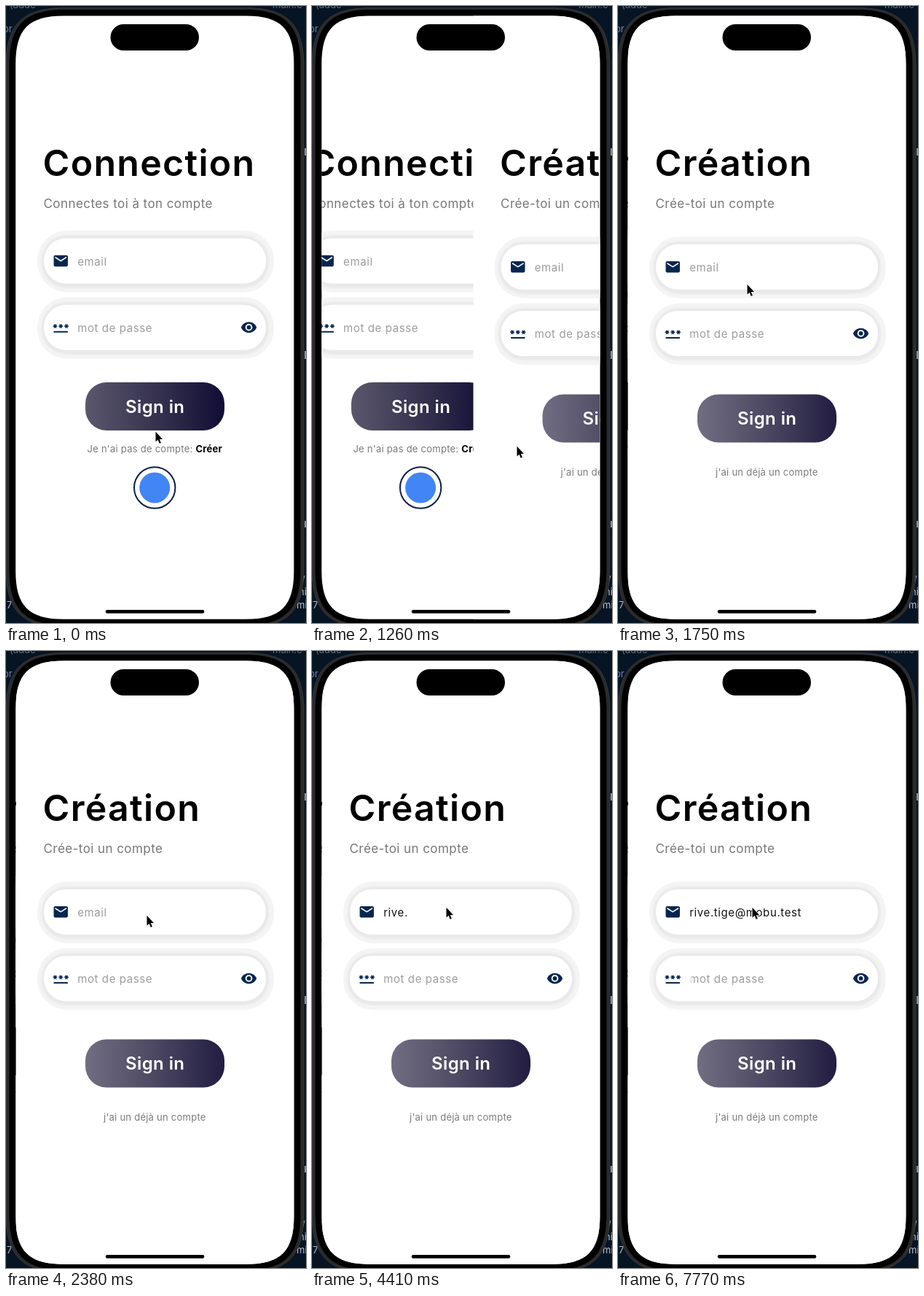
An HTML page that plays this animation: 412 by 846 pixels, repeating every 8000 ms.

```html
<!DOCTYPE html>
<html lang="fr">
<head>
<meta charset="utf-8">
<title>Connection</title>
<style>
  html, body { margin: 0; width: 100%; height: 100%; overflow: hidden; background: #061423; }
  svg { display: block; width: 412px; height: 846px; }
  text { font-family: Inter, "Open Sans", sans-serif; white-space: pre; }
  .code { font: 13px "Noto Sans Mono", "DejaVu Sans Mono", monospace; fill: #5d7087; }
  .title { font-size: 50px; font-weight: 600; letter-spacing: 1.3px; }
  .sub { font-size: 17px; letter-spacing: .43px; fill: #777; }
  .input { font-size: 15px; letter-spacing: .6px; fill: #111; }
  .hint { fill: #9c9c9c; }
  .note { font-size: 13px; letter-spacing: .25px; fill: #7a7a7a; }
  .note tspan { font-weight: 700; fill: #000; }
  .sign { font-size: 24px; font-weight: 600; letter-spacing: .4px; fill: #fff; }
  .icon { fill: #05264f; }
</style>
</head>
<body>
<svg viewBox="0 0 412 846">
  <defs>
    <clipPath id="screen"><path data-box="13.2 13.5 382.2 827.2 66 18"/></clipPath>
    <filter id="soft" x="-10%" y="-30%" width="120%" height="160%"><feGaussianBlur stdDeviation="1"/></filter>
    <linearGradient id="dark">
      <stop stop-color="#5a576d"/><stop offset=".5" stop-color="#37334f"/><stop offset="1" stop-color="#100d35"/>
    </linearGradient>
    <linearGradient id="pale">
      <stop stop-color="#716e82"/><stop offset=".5" stop-color="#4c4862"/><stop offset="1" stop-color="#221d41"/>
    </linearGradient>
    <g id="field">
      <rect x="43" y="-41.5" width="325" height="84.5" rx="41" fill="#f4f4f4"/>
      <rect x="48.5" y="-35" width="312.5" height="72" rx="35" fill="#e9e9e9" filter="url(#soft)"/>
      <rect x="52" y="-31" width="305" height="62" rx="30.5" fill="#fff"/>
    </g>
    <path id="star" d="M3.15 12.95 4 11.47l.85 1.48 1.3-.75-.85-1.48H7v-1.5H5.3l.85-1.47L4.85 7 4 8.47 3.15 7l-1.3.75.85 1.47H1v1.5h1.7l-.85 1.48z"/>
    <g id="mail" class="icon" transform="translate(63.6 -11.7) scale(.97)">
      <path d="M20 4H4c-1.1 0-2 .9-2 2v12c0 1.1.9 2 2 2h16c1.1 0 2-.9 2-2V6c0-1.1-.9-2-2-2zm0 4-8 5-8-5V6l8 5 8-5z"/>
    </g>
    <g id="lock" class="icon">
      <g transform="translate(63.6 -11.4) scale(.97)">
        <path d="M2 17h20v2H2z"/>
        <use href="#star"/><use href="#star" x="8"/><use href="#star" x="16"/>
      </g>
      <path transform="translate(321.9 -11.7) scale(.97)" fill-rule="evenodd" d="M12 4.5C7 4.5 2.73 7.61 1 12c1.73 4.39 6 7.5 11 7.5s9.27-3.11 11-7.5c-1.73-4.39-6-7.5-11-7.5zM12 17a5 5 0 0 1 0-10 5 5 0 0 1 0 10zm0-8a3 3 0 0 0 0 6 3 3 0 0 0 0-6z"/>
    </g>
    <g id="mailField"><use href="#field"/><use href="#mail"/></g>
    <g id="lockField">
      <use href="#field"/><use href="#lock"/>
      <text class="input hint" x="98.2" y="6.3">mot de passe</text>
    </g>
  </defs>

  <!-- editor behind the phone -->
  <rect width="412" height="846" fill="#061423"/>
  <g class="code">
    <text x="5" y="3">(adde</text>
    <text x="366" y="3">main.c</text>
    <text x="-4" y="36" fill="#6f88b0">or</text>
    <text x="1" y="826" fill="#b5c2cf">7</text>
    <text x="406" y="791" fill="#b5c2cf">/</text>
    <text x="402" y="808" fill="#b5c2cf">ni</text>
    <text x="399" y="826" fill="#b5c2cf">mi</text>
    <path d="M410 195h2v10h-2zM410 473h2v11h-2zM410 706h2v9h-2z" fill="#8492a3"/>
  </g>

  <!-- phone -->
  <path data-box="0 2.5 409 849.5 82 22" fill="#2a2a2b" stroke="#3e3e40" stroke-width=".8"/>
  <path data-box="4.5 5 400 844 77 21"/>

  <g clip-path="url(#screen)">
    <rect width="412" height="846" fill="#fff"/>
    <g id="login">
      <text class="title" x="50.5" y="233.3">Connection</text>
      <text class="sub" x="51.5" y="277">Connectes toi à ton compte</text>
      <use href="#mailField" y="349.5"/>
      <text class="input hint" x="98.2" y="355.8">email</text>
      <use href="#lockField" y="440.7"/>
      <rect x="109" y="516" width="191" height="66" rx="29" fill="url(#dark)"/>
      <text class="sign" x="164" y="557.7">Sign in</text>
      <text class="note" x="111.500" y="611.5">Je n'ai pas de compte: <tspan>Créer</tspan></text>
      <circle cx="204.2" cy="660.5" r="28.2" fill="#fff" stroke="#0d1f45" stroke-width="2"/>
      <circle cx="204.2" cy="660.5" r="21" fill="#4285f4"/>
    </g>
    <g id="signup">
      <rect x="14" width="382" height="846" fill="#fff"/>
      <text class="title" x="50.5" y="233.3">Création</text>
      <text class="sub" x="51.5" y="277">Crée-toi un compte</text>
      <use href="#mailField" y="357.7"/>
      <text class="input" id="email" x="98.2" y="364"></text>
      <use href="#lockField" y="449"/>
      <rect id="caret" x="98.5" y="441" width="2.2" height="17" fill="#fff" opacity=".75"/>
      <rect x="109" y="532.5" width="191" height="66" rx="29" fill="url(#pale)"/>
      <text class="sign" x="164" y="574.2">Sign in</text>
      <text class="note" x="134" y="644">j'ai un déjà un compte</text>
    </g>
    <g id="menu">
      <path d="M58 291.7h96q8 0 8 8v22.6q0 8-8 8h-48.5l-7.2 7-7.2-7H58q-8 0-8-8v-22.6q0-8 8-8z" fill="#212121"/>
      <path d="M118.5 292v38" stroke="#323232"/>
      <text x="65" y="316" font-size="14" fill="#fff">Paste</text>
      <path d="M134 308v-3.5h3.5M143.5 304.5h3.5v3.5M147 314.5v3.5h-3.5M137.5 318h-3.5v-3.5M136.5 308.7h8M136.5 311.3h8M136.5 313.9h5" fill="none" stroke="#fff" stroke-width="1.2"/>
    </g>
  </g>

  <rect x="143.5" y="25" width="121.5" height="36" rx="18"/>
  <rect x="136.8" y="828" width="135.5" height="4.7" rx="2.3"/>

  <path id="cursor" d="M.5 .8V14.6L3.6 11.800 5.700 16.800 7.900 15.900 5.800 10.900H10Z" stroke="#fff" stroke-width="1.2" paint-order="stroke"/>
</svg>

<script>
const LOOP = 8000, STEP = 70;
const SLIDE = { start: 1172, length: 500, width: 381, parallax: 121 };
const EMAIL = 'rive.tige@mobu.test';
const KEYS = [3010, 3150, 3290, 3360, 4410, 4830, 4900, 5110, 5180, 5600,
              6090, 6160, 6300, 6440, 6580, 7070, 7210, 7350, 7630];
const PATH = [ // time, x, y of the pointer
  [0, 205, 583], [300, 222, 640], [600, 258, 626], [840, 274, 605], [1260, 281, 603],
  [1400, 262, 560], [1680, 188, 405], [1750, 177, 381], [1820, 157, 354], [1890, 157, 354],
  [2030, 188, 379], [2100, 188, 379], [2380, 193, 362], [2660, 184, 350.5], [2800, 184, 351]
];
const $ = id => document.getElementById(id);
const clamp = v => Math.min(1, Math.max(0, v));

// Rounded box with continuous corners: reach l, handle inset c.
function squircle(x, y, w, h, l, c) {
  const r = x + w, b = y + h;
  return `M${x} ${y + l}C${x} ${y + c} ${x + c} ${y} ${x + l} ${y}H${r - l}` +
    `C${r - c} ${y} ${r} ${y + c} ${r} ${y + l}V${b - l}` +
    `C${r} ${b - c} ${r - c} ${b} ${r - l} ${b}H${x + l}` +
    `C${x + c} ${b} ${x} ${b - c} ${x} ${b - l}Z`;
}
for (const el of document.querySelectorAll('[data-box]'))
  el.setAttribute('d', squircle(...el.dataset.box.split(' ').map(Number)));

// cubic-bezier(.35, .91, .33, .97)
function ease(u) {
  const at = (a, b, s) => 3 * a * s * (1 - s) ** 2 + 3 * b * s * s * (1 - s) + s ** 3;
  let lo = 0, hi = 1;
  for (let i = 0; i < 24; i++) {
    const mid = (lo + hi) / 2;
    if (at(.35, .33, mid) < u) lo = mid; else hi = mid;
  }
  return at(.91, .97, lo);
}

function pointer(t) {
  const i = PATH.findIndex(p => p[0] > t);
  if (i < 0) return PATH[PATH.length - 1].slice(1);
  const [t0, x0, y0] = PATH[i - 1], [t1, x1, y1] = PATH[i];
  const k = (t - t0) / (t1 - t0);
  return [x0 + (x1 - x0) * k, y0 + (y1 - y0) * k];
}

const move = (id, x, y = 0) => $(id).setAttribute('transform', `translate(${x} ${y})`);

function draw(t) {
  const u = clamp((t - SLIDE.start) / SLIDE.length);
  const p = u < 1 ? ease(u) : 1;
  move('login', -p * SLIDE.parallax);
  move('signup', (1 - p) * SLIDE.width);
  $('signup').style.display = u > 0 ? '' : 'none';

  const typed = KEYS.filter(k => k <= t).length;
  $('email').textContent = typed ? EMAIL.slice(0, typed) : 'email';
  $('email').classList.toggle('hint', !typed);

  $('menu').style.opacity = typed ? 0 : clamp((t - 2380) / 140);
  $('caret').style.display = t >= 7770 ? '' : 'none';
  move('cursor', ...pointer(t));
}

const start = performance.now();
function tick() {
  const t = (performance.now() - start) % LOOP;
  draw(t - t % STEP);
  requestAnimationFrame(tick);
}
tick();
</script>
</body>
</html>
```
